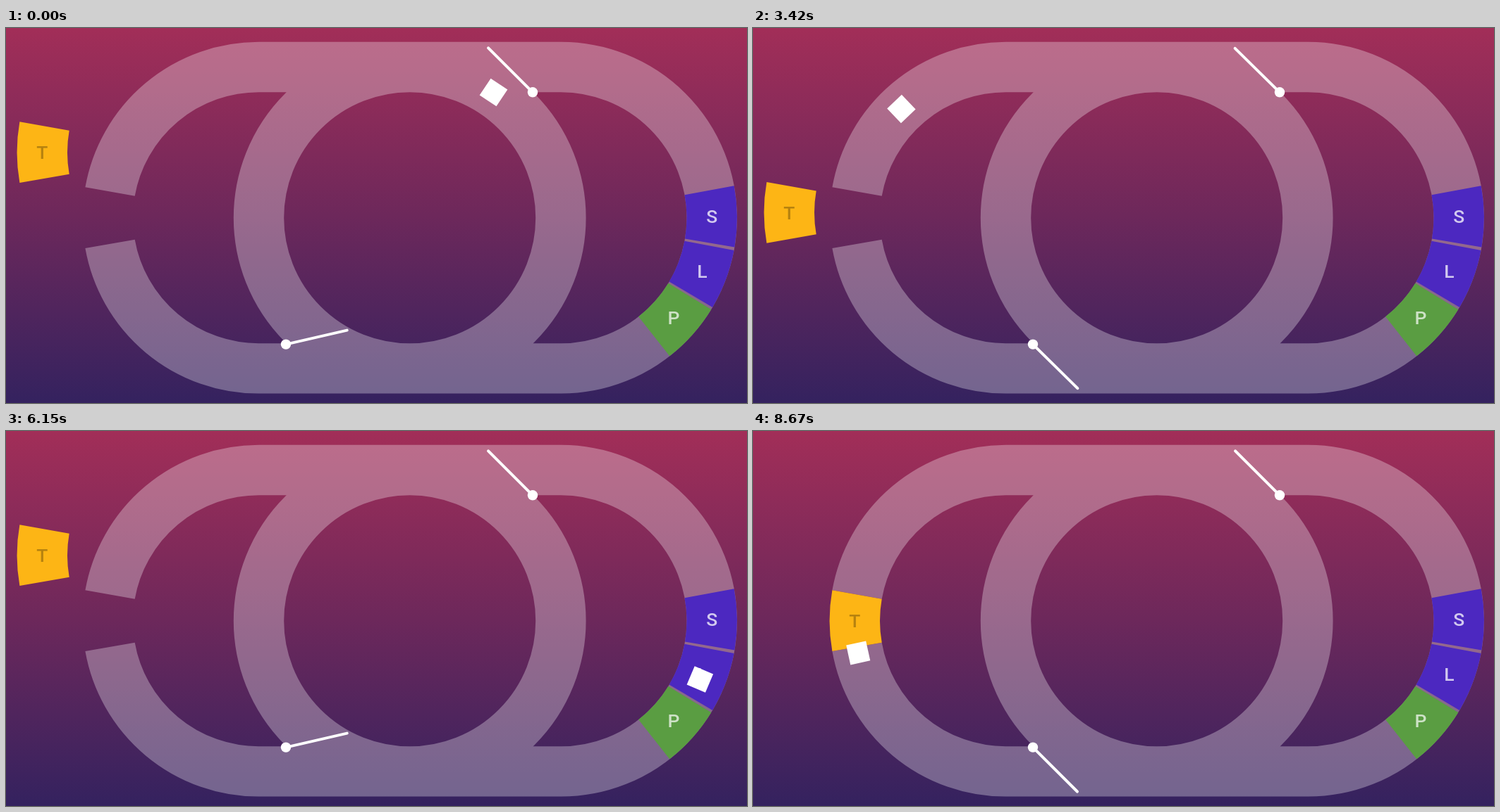
Write an HTML page with a canvas that moves like this. It is 1051x533 px and loops after 8700 ms.

```html
<!DOCTYPE html>
<html lang="en">
<head>
<meta charset="utf-8">
<title>Track switches</title>
<style>
html, body { margin: 0; width: 100%; height: 100%; overflow: hidden; background: #6b285b; }
canvas { display: block; width: 1051px; height: 533px; }
</style>
</head>
<body>
<canvas id="stage" width="1051" height="533"></canvas>
<script>
const ctx = document.getElementById('stage').getContext('2d');
const LOOP = 8700, W = 1051, H = 533;
const LEFT = 358.5, MID = 572.7, RIGHT = 787, CY = 269.7;
const R = 214.2, BAND = 71.4, HALF = Math.PI * R;
const rad = deg => deg * Math.PI / 180;

// Progress of an eased move that starts at `start` and lasts `span` ms
function ease(t, start, span = 500) {
  const p = Math.min(1, Math.max(0, (t - start) / span));
  return p < .5 ? 4 * p ** 3 : 1 - 4 * (1 - p) ** 3;
}

// The square's route: half turns and straights, [kind, start x, length]
const ROUTE = [
  ['down', MID, HALF], ['west', MID, MID - LEFT], ['up', LEFT, HALF],
  ['east', LEFT, RIGHT - LEFT], ['down', RIGHT, HALF],
  ['west', RIGHT, RIGHT - LEFT], ['up', LEFT, HALF]
];
// Distance travelled at given times: [ms, px]
const PACE = [[0, 125.6], [1470, 667.7], [2460, 1041.9], [4620, 1839],
  [6150, 2410.2], [7710, 3011.4], [8700, 3391.5]];

function distance(t) {
  const i = PACE.findIndex(p => t < p[0]);
  const [t0, d0] = PACE[i - 1], [t1, d1] = PACE[i];
  return d0 + (d1 - d0) * (t - t0) / (t1 - t0);
}

function pose(d) {
  let i = 0;
  while (d > ROUTE[i][2]) d -= ROUTE[i++][2];
  const [kind, x] = ROUTE[i];
  if (kind === 'west') return [x - d, CY + R, 0];
  if (kind === 'east') return [x + d, CY - R, 0];
  const turn = d / R, side = kind === 'down' ? 1 : -1;
  return [x + side * R * Math.sin(turn), CY - side * R * Math.cos(turn), turn];
}

const sky = ctx.createLinearGradient(0, 0, 0, H);
sky.addColorStop(0, '#a22e58');
sky.addColorStop(.5, '#6d285b');
sky.addColorStop(1, '#34225f');

const track = new Path2D();
track.arc(LEFT, CY, R, rad(190), rad(270));
track.arc(RIGHT, CY, R, rad(-90), rad(90));
track.arc(LEFT, CY, R, rad(90), rad(170));
track.moveTo(MID + R, CY);
track.arc(MID, CY, R, 0, rad(360));

function block(cx, from, to, fill, letter, ink) {
  const a = rad(from), b = rad(to), mid = (a + b) / 2;
  ctx.beginPath();
  ctx.arc(cx, CY, R + BAND / 2, a, b);
  ctx.arc(cx, CY, R - BAND / 2, b, a, true);
  ctx.fillStyle = fill;
  ctx.fill();
  ctx.fillStyle = ink;
  ctx.fillText(letter, cx + R * Math.cos(mid), CY + R * Math.sin(mid) + 9.3);
}

// `shut` runs from 0 (ring closed) to 1 (outer track closed)
function lever(x, y, side, shut) {
  const a = rad(-13 + 58 * shut);
  ctx.beginPath();
  ctx.moveTo(x, y);
  ctx.lineTo(x + side * 89 * Math.cos(a), y + side * 89 * Math.sin(a));
  ctx.stroke();
  ctx.beginPath();
  ctx.arc(x, y, 7.2, 0, rad(360));
  ctx.fill();
}

function draw(t) {
  ctx.fillStyle = sky;
  ctx.fillRect(0, 0, W, H);
  ctx.strokeStyle = 'rgba(255,255,255,.3)';
  ctx.lineWidth = BAND;
  ctx.lineCap = 'butt';
  ctx.stroke(track);

  ctx.font = '500 26.5px Roboto, sans-serif';
  ctx.textAlign = 'center';
  const pale = 'rgba(255,255,255,.75)';
  block(RIGHT, -10.5, 9.6, '#4c28c0', 'S', pale);
  block(RIGHT, 10.7, 30.6, '#4c28c0', 'L', pale);
  block(RIGHT, 31.4, 51.9, '#5a9d42', 'P', 'rgba(255,255,255,.7)');

  // The loose block drops, slides in, then backs out and lifts away
  const dropped = ease(t, 1480) - ease(t, 3340, 300) + ease(t, 7340);
  const inserted = ease(t, 1980) - ease(t, 3060, 300) + ease(t, 7840);
  ctx.save();
  ctx.translate(93 * (inserted - 1), 93 * (dropped - 1));
  block(LEFT, 170, 190, '#fdb515', 'T', 'rgba(0,0,0,.28)');
  ctx.restore();

  const [x, y, turn] = pose(distance(t));
  ctx.fillStyle = ctx.strokeStyle = '#fff';
  ctx.save();
  ctx.translate(x, y);
  ctx.rotate(turn);
  ctx.fillRect(-14.3, -14.3, 28.6, 28.6);
  ctx.restore();

  ctx.lineWidth = 4;
  ctx.lineCap = 'round';
  lever(747, 91.3, -1, 1 - ease(t, 3360) + ease(t, 5050));
  lever(397, 449.6, 1, ease(t, 2155) - ease(t, 3360) + ease(t, 8010));
}

const begin = performance.now();
function tick() {
  draw((performance.now() - begin) % LOOP);
  requestAnimationFrame(tick);
}
tick();
</script>
</body>
</html>
```
